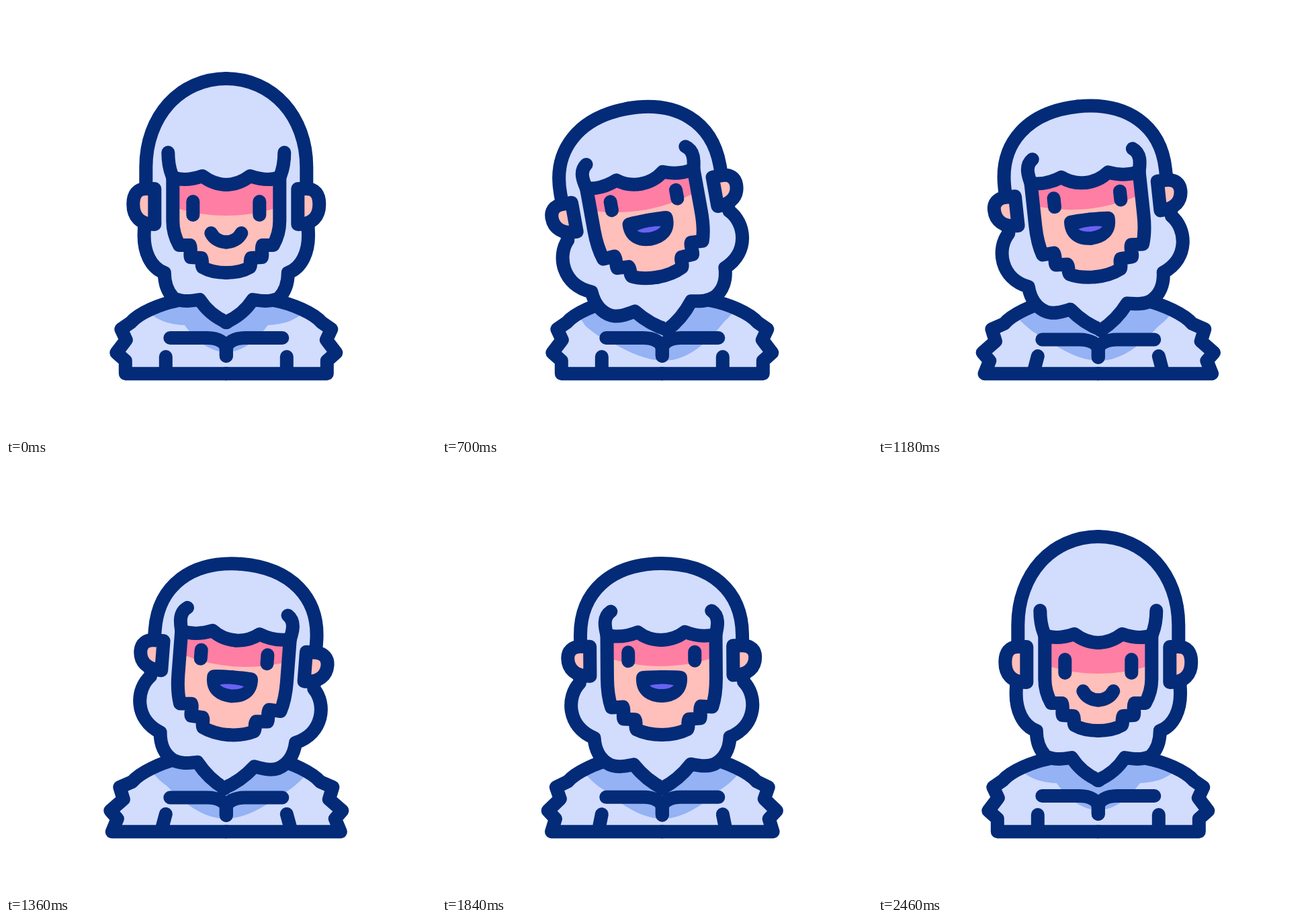
Animation of 640x640 px, one loop 2.6 s. Source, as an HTML page:

```html
<!DOCTYPE html>
<html lang="en">
<head>
<meta charset="utf-8">
<title>Laughing yeti</title>
<style>
  html, body { margin: 0; width: 100%; height: 100%; overflow: hidden; background: #fff; }
  svg { display: block; width: 100%; height: 100%; }
  path { fill: none; stroke-linecap: round; stroke-linejoin: round; }
  .line { stroke: #032b78; stroke-width: 20; }
  .fur { fill: #d2dcfd; }
  .shade { fill: #94b2f4; }
  .skin { fill: #ffbfba; }
  .mask { fill: #ff7ea4; }
  .mouth { fill: #032b78; }
  .tongue { fill: #6a62f4; }
</style>
</head>
<body>
<svg viewBox="0 0 640 640">
  <g transform="translate(327.8 0)">
    <clipPath id="torso"></clipPath>
    <g id="body"></g>
    <g clip-path="url(#torso)"><g id="shadow"></g></g>
    <g id="trim"></g>
    <g id="head"></g>
  </g>
</svg>
<script>
const LOOP = 2600;
const NS = 'http://www.w3.org/2000/svg';
const el = id => document.getElementById(id);
const parts = [];

// A left half and its mirror image, morphing from path a to path b.
function part(parent, cls, drive, a, b) {
  const halves = [1, -1].map(side => {
    const p = document.createElementNS(NS, 'path');
    p.setAttribute('class', cls);
    p.setAttribute('transform', `scale(${side} 1)`);
    el(parent).append(p);
    return p;
  });
  parts.push({ halves, drive, a, to: b.match(/-?[\d.]+/g).map(Number) });
}

const torsoA = 'M1 438 L-70 438 C-98 443 -130 457 -142 471 L-156.5 481 L-149 497 L-163.5 516 L-150 528 L-150 547.3 L1 547.3';
const torsoB = 'M1 438 L-70 438 C-98 445 -128 459 -140 473 L-158.5 481 L-153 499 L-172.5 516 L-162 528 L-170 547.3 L1 547.3';
part('torso', '', 'body', torsoA, torsoB);
part('body', 'fur', 'body', torsoA, torsoB);
part('trim', 'line', 'body', torsoA.replace('M1 438 L', 'M'), torsoB.replace('M1 438 L', 'M'));
part('trim', 'line', 'body', 'M-90 522 L-90 547', 'M-90 521 L-97 547');
part('trim', 'line', 'body',
  'M-83.5 494 L-28 494 C-12 494 0 501 0 511 L0 521',
  'M-83.5 496.5 L-28 496.5 C-12 496.5 0 503 0 512 L0 523');

part('shadow', 'shade', 'head',
  'M1 420 L-125 420 L-113 458 C-98 470 -82 474 -62 475 C-45 498 -25 515 1 515',
  'M1 420 L-130 430 L-119 455 C-107 470 -98 478 -85 486 C-54 513 -27 528 1 528');

// Hood and beard
part('head', 'fur line', 'head',
  'M1 108 C-70 108 -119.5 165 -119.5 240 L-119.5 262 L-122 335 C-124 366 -112 390 -92 397 C-92 412 -88 425 -78 435 C-65 441 -52 439 -39.5 437 C-30 452 -15 464 1 471',
  'M1 148 C-75 148 -120.5 190 -120.5 255 L-120.5 262 L-122 325 C-142 345 -142 390 -101 407 C-100 425 -92 440 -78 447 C-66 452 -54 449 -42.5 447 C-30 463 -15 475 1 483');

// Ear
part('head', 'skin line', 'head',
  'M-106.5 272 L-119.5 272 C-132 272 -138.5 280 -138.5 295 C-138.5 313 -129 325 -106.5 325 Z',
  'M-106.5 271 L-121 271 C-133 271 -139.5 278 -139.5 288 C-139.5 304 -129 315 -106.5 315 Z');

// Face opening
const faceA = 'M1 266 C-12 266 -25 261 -35.5 253 C-50 258 -66 260 -79.5 255 L-79.5 ';
const faceB = 'M1 262 C-12 262 -25 258 -35 250 C-50 256 -66 258 -81 254 L-81 ';
const jawA = faceA + '320 C-79.5 335 -75 347 -70 356 L-54 356 C-51 362 -55 368 -53 374 L-37 375 C-34 380 -38 385 -35 389 C-25 395 -12 397 1 397';
const jawB = faceB + '318 C-81 335 -79 350 -75 362 L-58 361 C-55 367 -59 374 -57 379 L-40 380 C-37 385 -41 390 -38 395 C-26 401 -12 403 1 403';
part('head', 'skin', 'head', jawA, jawB);
part('head', 'mask', 'head',
  faceA + '301 L-70 302 C-45 309 -22 312 1 312',
  faceB + '290 L-70 291 C-45 298 -22 301 1 301');
part('head', 'line', 'head', jawA, jawB);
part('head', 'line', 'head',
  'M-86.5 218 C-86.5 232 -84 245 -79.5 255',
  'M-75 219 C-87 227 -84 242 -81 254');

part('head', 'line', 'head', 'M-49.5 291 L-49.5 311', 'M-49.5 280 L-49.5 293');
part('head', 'mouth line', 'head',
  'M1 351.5 C-9 351.5 -18 347 -22.5 338 C-18 347 -9 351.5 1 351.5',
  'M1 345 C-15 345 -29 338 -28 318 C-22 317 -11 317 1 317');
part('head', 'tongue', 'tongue',
  'M1 335 C0 335 0 335 0 335 C0 335 0 335 1 335',
  'M1 327.5 C-6 327.5 -13 328 -18 329.5 C-13 334 -6 335 1 335');

const wave = x => (1 - Math.cos(Math.PI * x)) / 2;
const clamp = x => Math.min(1, Math.max(0, x));

// [time, value] keys joined by smooth half waves
function ease(keys, t) {
  const i = keys.findIndex(k => k[0] > t);
  if (i < 1) return keys[i < 0 ? keys.length - 1 : 0][1];
  const [t0, a] = keys[i - 1], [t1, b] = keys[i];
  return a + (b - a) * wave((t - t0) / (t1 - t0));
}

const squash = [[220, 0], [540, 1], [2080, 1], [2440, 0]];
const tilt = [[380, 0], [540, 17], [768, -17], [890, 17], [1122, -17], [1276, 17],
  [1480, -17], [1680, 17], [1840, -0.4], [1960, 0]];
const rests = [220, 460, 700, 865, 1067, 1270, 1450, 1690, 1915, 2140, 2400];

// One chest heave between each pair of rests
function heave(t) {
  const i = rests.findIndex(r => r > t);
  return i < 1 ? 0 : wave(2 * (t - rests[i - 1]) / (rests[i] - rests[i - 1]));
}

function draw(t) {
  const head = ease(squash, t);
  const amount = { head, body: heave(t), tongue: clamp(head * 2 - 1) };
  for (const { halves, drive, a, to } of parts) {
    let i = 0;
    const d = a.replace(/-?[\d.]+/g, n => (+n + (to[i++] - n) * amount[drive]).toFixed(2));
    halves.forEach(p => p.setAttribute('d', d));
  }
  const turn = `rotate(${ease(tilt, t).toFixed(3)} 0 440)`;
  el('head').setAttribute('transform', turn);
  el('shadow').setAttribute('transform', turn);
}

const start = performance.now();
function tick() {
  draw((performance.now() - start) % LOOP);
  requestAnimationFrame(tick);
}
tick();
</script>
</body>
</html>
```
